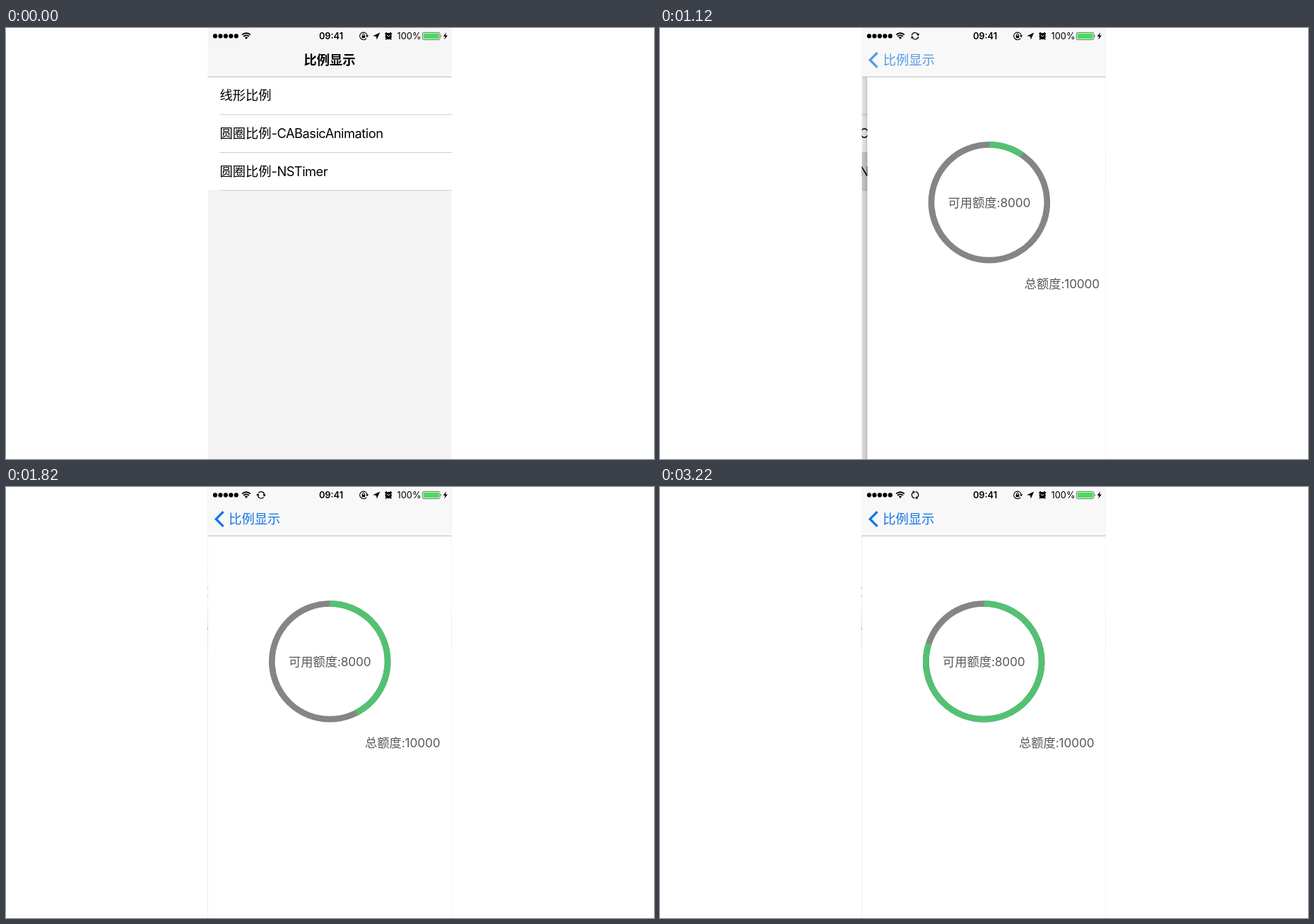
An HTML page for the animation above (3.36 s loop, 917 by 611 pixels).

```html
<!DOCTYPE html>
<html lang="zh-CN">
<head>
<meta charset="utf-8">
<title>比例显示</title>
<style>
  html, body { margin: 0; width: 100%; height: 100%; overflow: hidden; background: #fff; }
  svg { display: block; width: 100%; height: 100%; }
  text { font: 18.3px Inter, "Noto Sans CJK SC", "Noto Sans CJK", sans-serif; fill: #000; }
  .latin { letter-spacing: -.5px; }
  .value { font-size: 17.25px; fill: #585858; }
  .value tspan { letter-spacing: -.15px; }
  .small { font-size: 12.8px; }
  .line { stroke: #cdcdcd; stroke-width: 1; }
  .thin { fill: none; stroke: #000; }
</style>
</head>
<body>
<svg viewBox="0 0 917 611">
  <defs>
    <clipPath id="screen"><rect x="285.7" width="344.8" height="611"/></clipPath>
    <linearGradient id="shade">
      <stop offset="0" stop-opacity="0"/>
      <stop offset=".6" stop-opacity=".04"/>
      <stop offset="1" stop-opacity=".16"/>
    </linearGradient>
  </defs>
  <g clip-path="url(#screen)">
    <rect x="285" width="346" height="611" fill="#f3f3f3"/>
    <g id="list">
      <rect x="285.7" y="69" width="450" height="161" fill="#fff"/>
      <rect id="picked" x="285.7" y="176.3" width="450" height="54" fill="#d9d9d9"/>
      <path class="line" d="M302 122.8H735M302 176.5H735M302 230.2H735"/>
      <text x="302.4" y="102.4">线形比例</text>
      <text x="302.4" y="156">圆圈比例<tspan class="latin">-CABasicAnimation</tspan></text>
      <text x="302.4" y="209.7">圆圈比例<tspan class="latin">-NSTimer</tspan></text>
    </g>
    <rect id="dim" x="285" width="346" height="611"/>

    <g id="page">
      <rect x="276" y="69" width="9.7" height="542" fill="url(#shade)"/>
      <rect x="285.7" y="69" width="346" height="542" fill="#fff"/>
      <g fill="none" stroke-width="8.7">
        <circle cx="458.2" cy="247.3" r="81.9" stroke="#858585"/>
        <circle id="arc" cx="458.2" cy="247.3" r="81.9" stroke="#54c172" pathLength="1" transform="rotate(-90 458.2 247.3)"/>
      </g>
      <text class="value" x="458.2" y="253.7" text-anchor="middle">可用额度<tspan>:8000</tspan></text>
      <text class="value" x="614.4" y="368.8" text-anchor="end">总额度<tspan>:10000</tspan></text>
    </g>

    <rect id="bar" x="285" width="346" height="69"/>
    <path d="M285 69.3H631" stroke="#b9b9b9"/>
    <text id="title" x="458.1" y="52" text-anchor="middle" font-weight="600" style="font-weight:600">比例显示</text>
    <path id="chevron" d="M307.6 35L297.2 45.4L307.6 55.8" fill="none" stroke="#1675e6" stroke-width="3.3"/>
    <text id="back" x="315.2" y="52" style="fill:#1675e6">比例显示</text>

    <path d="M296 11.4h30" stroke="#000" stroke-width="6.2" stroke-linecap="round" stroke-dasharray="0 7.45"/>
    <g class="thin" stroke-width="1.9">
      <path d="M334.2 9.6A8.3 8.3 0 0 1 345.8 9.6M336.2 12A5.2 5.2 0 0 1 343.8 12"/>
    </g>
    <path d="M340 16L337.8 13.6A3.2 3.2 0 0 1 342.2 13.6Z"/>
    <g id="sync">
      <g id="half">
        <path class="thin" stroke-width="1.2" d="M-2 4.3A4.7 4.7 0 0 1 -1.2 -4.5"/>
        <path d="M-1.7 -6.9V-2.2L1.3 -4.5Z"/>
      </g>
      <use href="#half" transform="rotate(180)"/>
    </g>
    <text class="small" x="460" y="16" text-anchor="middle" style="font-weight:600">09:41</text>

    <path class="thin" stroke-width="1.1" d="M510.2 14.6A5.3 5.3 0 1 1 511.2 10.8"/>
    <path d="M508.9 10.4H513.3L511.1 13.2ZM503.6 10.7h4.6v3.5h-4.6Z"/>
    <path class="thin" d="M504.5 11V9.6a1.4 1.4 0 0 1 2.8 0V11"/>
    <path d="M529.3 6.4L524.8 16.4L523.9 12L519.2 11.2Z"/>
    <circle cx="541.2" cy="11.7" r="4.6"/>
    <path class="thin" stroke-width="1.8" d="M536.4 8.6L539 6.5M543.4 6.5L546 8.6M538.2 15.2L537.2 16.4M544.2 15.2L545.2 16.4"/>
    <path d="M538.9 10L541.2 12.1L543.6 10.3" fill="none" stroke="#fff"/>
    <text class="small" x="553.6" y="16">100%</text>
    <rect x="589.3" y="6.4" width="24.6" height="10.2" rx="1.8" fill="#fff" stroke="#4b6b50" stroke-width=".9"/>
    <rect x="590.6" y="7.7" width="22" height="7.6" rx=".8" fill="#4cd95c"/>
    <path d="M614.9 9.6q1.6 1.9 0 3.8Z" fill="#333"/>
    <path d="M623.2 6.2L618.6 12H621.4L620.2 16.6L625 10.5H622Z"/>
  </g>
</svg>
<script>
  const LOOP = 3360, STEP = 140, WIDTH = 344.8;
  const el = id => document.getElementById(id);
  const set = (id, attrs) => {
    for (const name in attrs) el(id).setAttribute(name, attrs[name]);
  };
  const slide = x => `translate(${x.toFixed(2)} 0)`;

  function draw(now) {
    const t = Math.floor(now % LOOP / STEP) * STEP;
    const pushed = t >= 980;
    const gap = pushed ? 162.3 * Math.exp(-3.05 * (t - 980) / STEP) : WIDTH + 10;
    const k = pushed ? 1 - gap / WIDTH : 0;
    const done = Math.max(0, Math.min(.8, .095 + (t - 1120) * .00047));
    const fade = k ** 15;

    set('list', { transform: slide(-.3 * WIDTH * k) });
    set('picked', { opacity: +pushed });
    set('dim', { opacity: .1 * k });
    set('page', { transform: slide(gap) });
    set('arc', { 'stroke-dasharray': `${done} 2` });
    set('bar', { fill: pushed ? '#f8f8f8' : '#f6f6f6' });
    set('title', { transform: slide(-94 * k), opacity: Math.max(0, 1 - 1.3 * k) });
    set('chevron', { opacity: pushed ? Math.max(.06, fade) : 0 });
    set('back', { transform: slide(.08 * gap), opacity: fade });
    set('sync', {
      transform: `translate(361 11.3) rotate(${8 + (t - 2100) * .3})`,
      opacity: +(t >= 1120)
    });
  }

  const start = performance.now();
  function tick() {
    draw(performance.now() - start);
    requestAnimationFrame(tick);
  }
  tick();
</script>
</body>
</html>
```
